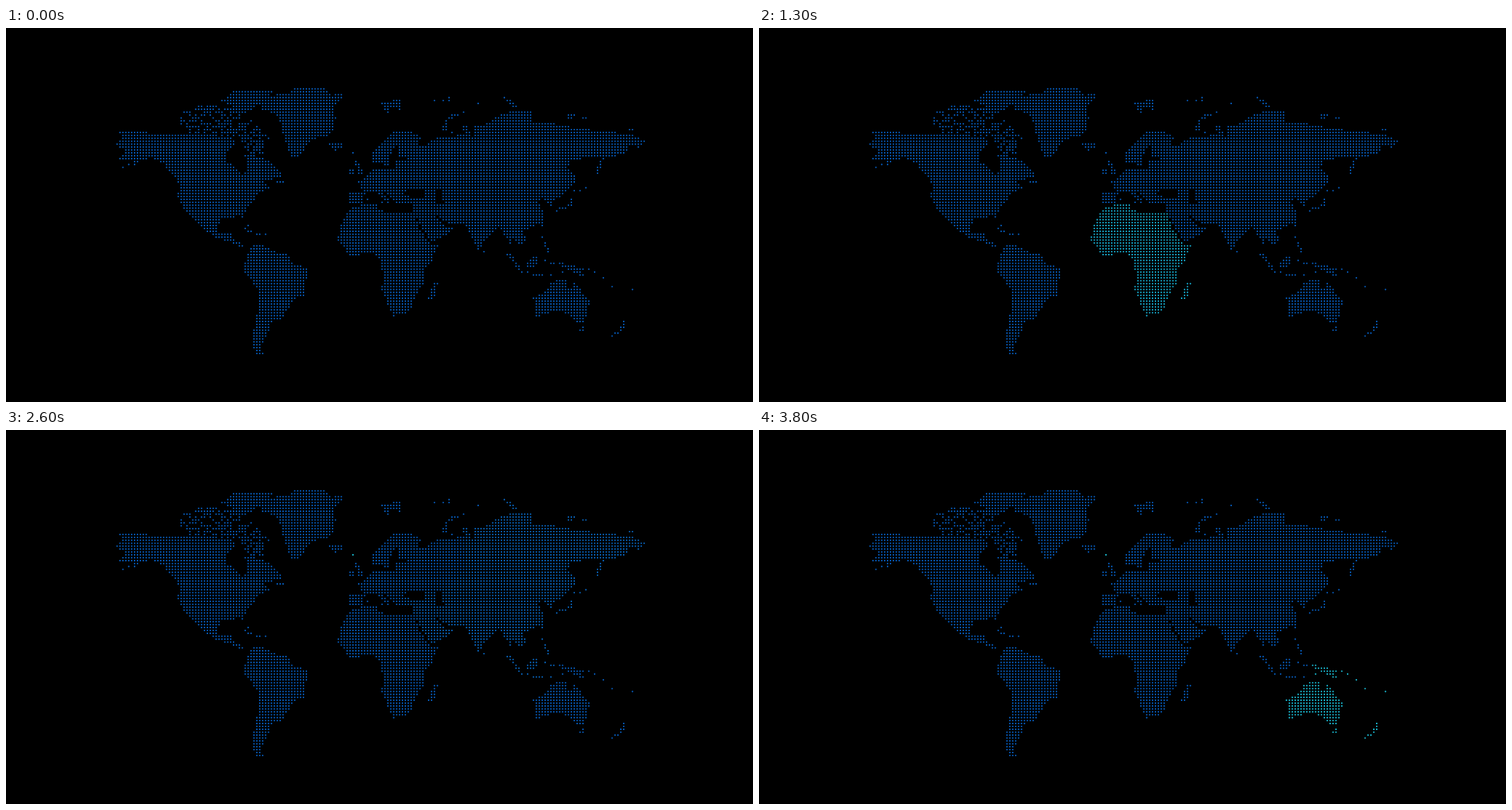
Write an HTML page with a canvas that moves like this. It is 1057 px wide and 530 px high and loops after 4000 ms.

```html
<!DOCTYPE html>
<html lang="en">
<head>
<meta charset="utf-8">
<title>Dotted world map</title>
<style>
  html, body { margin: 0; width: 100%; height: 100%; overflow: hidden; background: #000; }
  canvas { display: block; }
</style>
</head>
<body>
<canvas id="map" width="1057" height="530"></canvas>
<script>
const ctx = document.getElementById('map').getContext('2d');
const LOOP = 4000, SLOT = 800, STEP = 100;
const X0 = 153.1, Y0 = 86.3, PITCH = 4.12, COLS = 183, ROWS = 92, RADIUS = 1.08;
const BASE = [7, 101, 207], LIT = [28, 207, 232];

// Coastlines; every grid point inside becomes a dot.
const northAmerica = `M160 146 201 146 203 150 268 150 322 157 326 165 311 177 311 187
  334 208 342 198 338 179 352 181 371 188 390 204 390 211 366 217 375 226 356 236 336 263
  335 272 331 267 304 269 298 286 302 292 319 288 318 298 331 304 339 315 322 306 296 297
  270 277 247 250 243 238 245 220 222 192 205 183 185 190 160 187 168 174 152 166 163 156Z`;
const greenland = `M410 84 452 84 460 95 480 93 462 112 467 128 462 146 455 153 432 158
  414 183 403 184 392 148 386 128 380 121 358 114 367 97 398 92Z`;
const ellesmere = 'M324 88 378 88 366 104 340 120 320 120 322 112 304 104Z';
const arctic = 'M243 130 275 109 320 112 340 124 375 155 365 178 340 178 328 158 260 152Z';
const southAmerica = `M345 309 362 307 384 318 395 319 408 334 430 343 425 358 421 381
  408 384 390 411 375 418 372 430 362 450 364 462 355 463 347 446 358 390 358 372 337 346
  337 335 342 322Z`;

const africa = `M486 257 505 249 525 248 528 258 545 261 578 261 585 285 600 306 612 307
  602 330 590 345 592 362 580 378 571 402 548 409 540 392 531 370 534 350 527 325 520 319
  488 323 469 302 473 280Z`;
const madagascar = 'M604 360 612 360 605 385 597 385Z';

const europe = `M486 233 505 233 498 216 506 216 512 206 523 199 548 201 552 187 568 187
  568 183 552 184 557 168 554 163 543 180 543 195 519 191 518 176 532 162 548 146 572 147
  590 156 580 162 592 169 600 158 649 150 649 199 630 220 606 230 566 227 562 249 551 249
  538 233 530 232 543 243 540 248 520 231 509 234 503 249 486 249Z`;
const britain = 'M493 187 497 187 508 207 497 207Z M485 200 492 200 492 207 485 207Z';
const novayaZemlya = 'M617 138 630 122 642 122 624 133 624 146 617 146Z';

const asia = `M649 150 646 139 655 134 655 146 662 156 664 138 680 136 690 127 717 118
  743 118 745 132 773 135 804 141 842 146 884 150 904 160 898 170 884 166 874 180 850 183
  828 182 800 189 794 198 806 208 805 220 774 247 771 254 757 241 753 247 762 262 760 276
  730 288 736 299 728 311 718 300 713 298 718 319 711 300 698 283 676 304 668 316 650 279
  626 277 607 264 622 283 633 284 628 291 601 305 576 260 576 250 563 247 563 238 592 241
  590 230 606 230 630 220 649 199Z`;
const asiaIslands = `M842 184 847 184 838 207 833 205Z M736 331 754 320 750 338 738 338Z
  M707 319 713 319 733 346 728 347Z M699 97 706 97 726 112 718 112Z
  M799 241 802 241 802 253 778 261 778 257 797 250Z M757 294 760 294 770 319 765 319Z`;

const australia = `M746 383 770 368 770 361 783 357 793 357 792 365 801 369 803 357 809 366
  826 386 819 418 808 417 790 403 776 401 750 410Z`;
const pacificIslands = `M780 331 817 341 812 351 790 340Z
  M872 415 877 415 874 427 858 438 855 436 868 428Z`;

const svalbard = 'M530 106 558 101 558 117 545 112 540 121Z';
const iceland = 'M456 163 477 163 474 170 465 174Z';
const seas = new Path2D(`M566 227 576 228 591 236 590 240 566 238Z
  M607 228 616 229 619 249 610 249Z`);

// Loose islands: x, y of the first dot and how many follow in the row.
const americaRuns = [165,197,1, 173,193,1, 181,193,1, 252,119,3, 338,284,1, 342,280,1,
  342,288,2, 354,292,2, 367,292,1, 383,218,3];
const europeRuns = [606,103,1, 618,103,1, 627,98,1, 627,103,1, 668,107,1, 647,119,1,
  631,148,1, 512,242,1, 532,247,1];
const asiaRuns = [796,123,3, 796,127,2, 816,127,2, 882,144,2, 804,230,1, 812,230,1,
  820,226,1, 758,280,1, 676,317,1, 738,346,1, 746,350,4, 771,350,1, 763,329,1, 771,333,2];
const pacificRuns = [787,346,1, 816,350,1, 825,342,1, 833,346,1, 845,354,1, 857,366,1,
  886,370,1, 816,424,1, 812,428,2];

const used = new Set();

function speckle(c, r) {
  const s = Math.sin(c * 12.9898 + r * 78.233) * 43758.5453;
  return s - Math.floor(s) < 0.58;
}

function collect(shapes, runs = [], broken = null) {
  const dots = new Path2D();
  const put = (c, r) => {
    const key = r * COLS + c;
    if (used.has(key)) return;
    used.add(key);
    const x = X0 + c * PITCH, y = Y0 + r * PITCH;
    dots.moveTo(x + RADIUS, y);
    dots.arc(x, y, RADIUS, 0, Math.PI * 2);
  };
  const fill = (shape, keep) => {
    const land = new Path2D(shape);
    for (let r = 0; r < ROWS; r++) {
      for (let c = 0; c < COLS; c++) {
        const x = X0 + c * PITCH, y = Y0 + r * PITCH;
        if (ctx.isPointInPath(land, x, y) && !ctx.isPointInPath(seas, x, y) && keep(c, r)) put(c, r);
      }
    }
  };
  shapes.forEach(shape => fill(shape, () => true));
  if (broken) fill(broken, speckle);
  for (let i = 0; i < runs.length; i += 3) {
    const c = Math.round((runs[i] - X0) / PITCH);
    const r = Math.round((runs[i + 1] - Y0) / PITCH);
    for (let k = 0; k < runs[i + 2]; k++) put(c + k, r);
  }
  return dots;
}

// Continents in the order they light up.
const continents = [
  collect([northAmerica, greenland, ellesmere, southAmerica], americaRuns, arctic),
  collect([africa, madagascar]),
  collect([europe, britain, novayaZemlya], europeRuns),
  collect([asia, asiaIslands], asiaRuns),
  collect([australia, pacificIslands], pacificRuns)
];
const still = collect([svalbard, iceland]);
const lone = collect([], [491, 177, 1]);

function glow(age) {
  const u = Math.min(1, Math.max(0, (age - 100) / 540));
  return u * u * (3 - 2 * u);
}

function paint(dots, amount) {
  const rgb = BASE.map((v, i) => Math.round(v + (LIT[i] - v) * amount));
  ctx.fillStyle = `rgb(${rgb})`;
  ctx.fill(dots);
}

function draw(now) {
  const t = Math.floor((now % LOOP) / STEP) * STEP;
  ctx.fillStyle = '#000';
  ctx.fillRect(0, 0, 1057, 530);
  continents.forEach((dots, i) => {
    const age = t - i * SLOT;
    paint(dots, age < SLOT ? glow(age) : 0);
  });
  paint(still, 0);
  paint(lone, glow(t - 2 * SLOT)); // stays lit until the loop ends
  requestAnimationFrame(draw);
}

draw(0);
</script>
</body>
</html>
```
